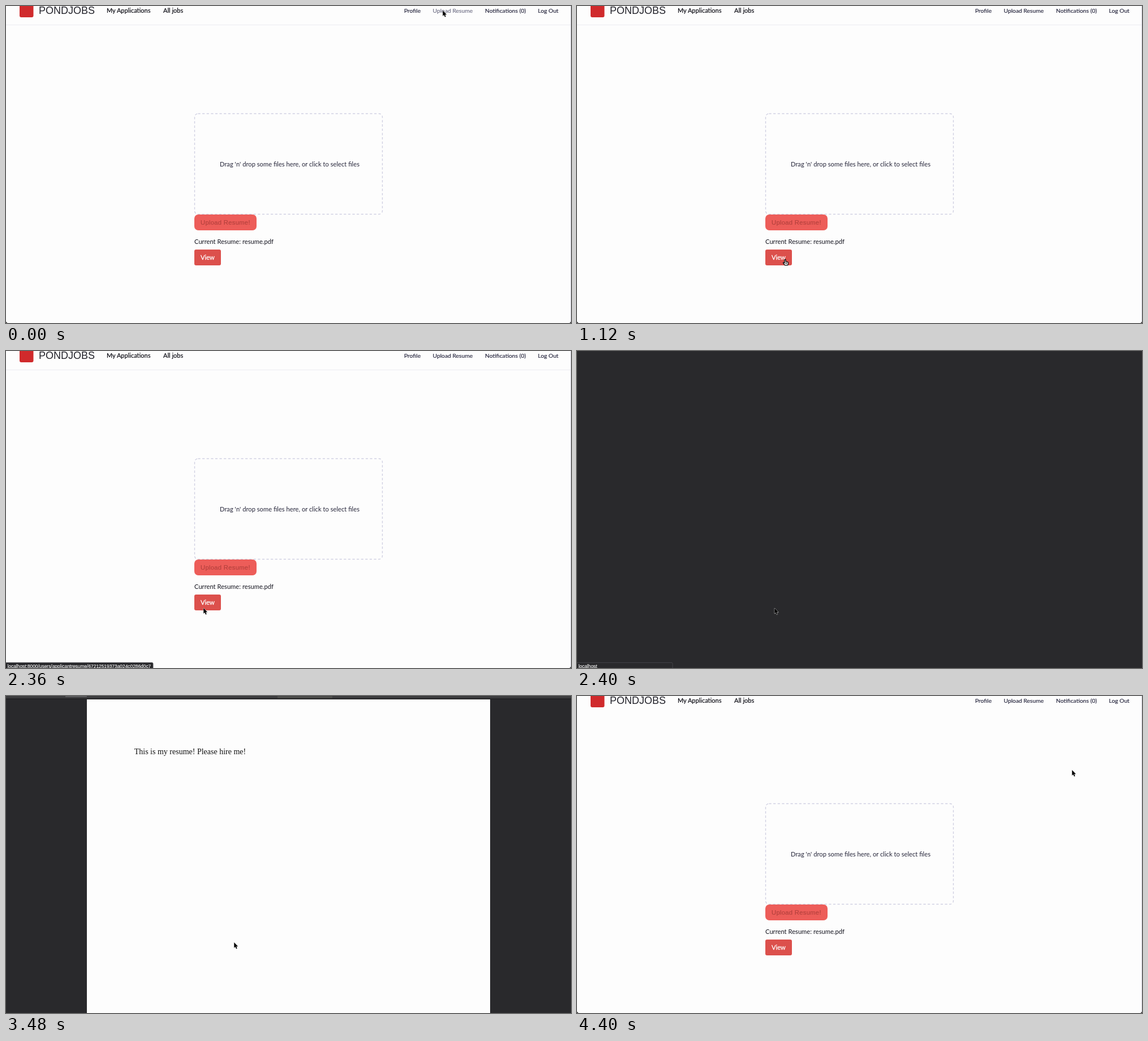
Animation, 999 px wide and 561 px high, one loop 4480 ms. Source, as an HTML page:

```html
<!DOCTYPE html>
<html lang="en">
<head>
<meta charset="utf-8">
<title>Resume upload</title>
<style>
  html, body { margin: 0; width: 100%; height: 100%; overflow: hidden; background: #fdfdfd; }
  svg { display: block; width: 999px; height: 561px; }
  text { font-family: Lato, sans-serif; font-size: 11.2px; fill: #14141f; white-space: pre; }
  .brand { font: 18px "Liberation Sans", Arial, sans-serif; fill: #23232b; }
  .main text { font-size: 11px; fill: #0c0c14; stroke: #0c0c14; stroke-width: .2px; }
  .side text { font-size: 10.3px; fill: #22223a; stroke: #22223a; stroke-width: .15px; }
  .side .hover { fill: #6d6d84; stroke: #6d6d84; }
  .off { font: 11.2px "Liberation Sans", Arial, sans-serif; letter-spacing: .02857em; fill: #b4423e; stroke: #b4423e; stroke-width: .2px; }
  .view { fill: #fff; stroke: #fff; stroke-width: .3px; }
  .letter { font: 14px "Liberation Serif", Times, serif; fill: #111; }
  .status text { font: 8.4px "Liberation Sans", Arial, sans-serif; fill: #f4f4f4; stroke: #f4f4f4; stroke-width: .15px; }
  .status rect { fill: #29292c; stroke: #4b4b50; stroke-width: .8; }
</style>
</head>
<body>
<svg viewBox="0 0 999 561">
  <g id="site">
    <rect width="999" height="561" fill="#fdfdfd"/>
    <rect x="24" y="-4" width="24.5" height="24" rx="3" fill="#d02a2c"/>
    <text class="brand" x="58" y="14">PONDJOBS</text>
    <g class="main">
      <text x="178" y="12">My Applications</text>
      <text x="278" y="12">All jobs</text>
    </g>
    <g class="side">
      <text x="704" y="11.5">Profile</text>
      <text id="upload" x="754.5" y="11.5">Upload Resume</text>
      <text x="847" y="11.5">Notifications (0)</text>
      <text x="940.5" y="11.5">Log Out</text>
    </g>
    <rect id="rule" y="33" width="998" height="1" fill="#ececf1"/>
    <rect x="333.5" y="190.5" width="332" height="178" rx="6" fill="none" stroke="#d0d0e2" stroke-width="1.4" stroke-dasharray="4.2 3.4"/>
    <text x="378" y="283.7" style="fill:#26263a">Drag 'n' drop some files here, or click to select files</text>
    <rect x="333" y="369" width="110" height="28" rx="7" fill="#ed5d59"/>
    <text class="off" x="344" y="386.5">Upload Resume!</text>
    <text x="333" y="420.7">Current Resume: resume.pdf</text>
    <rect x="333" y="431" width="47" height="28" rx="3" fill="#dc504c"/>
    <text class="view" x="344" y="449">View</text>
    <rect x="998" width="1" height="561" fill="#d9d9e4"/>
    <path d="M0 558.5V561H2.5ZM999 558.5V561H996.5Z" fill="#333"/>
  </g>
  <g id="viewer">
    <rect width="999" height="561" fill="#29292c"/>
    <g id="paper">
      <rect width="999" height="5" fill="#3b3b3d"/>
      <rect x="105" width="38" height="2" fill="#5c5c5e"/>
      <rect x="480" width="97" height="4" fill="#4b4b4a"/>
      <rect y="4.5" width="999" height="1.2" fill="#1d1d1f"/>
      <rect x="143" y="6" width="713" height="555" fill="#fdfdfd"/>
    </g>
    <text id="letter" class="letter" x="226.7" y="103">This is my resume! Please hire me!</text>
  </g>
  <g id="link" class="status">
    <rect x="-2" y="551.4" width="262" height="14" rx="2"/>
    <text x="2.5" y="560.8">localhost:8000/users/applicantresume/67212519373a024c0286d0c7</text>
  </g>
  <g id="host" class="status">
    <rect x="-2" y="551.4" width="171" height="14" rx="2"/>
    <text x="2.5" y="560.8">localhost</text>
  </g>
  <g id="pointer">
    <path id="arrow" d="M.3 0V9.8L2.5 7.8L4 11.4L5.7 10.7L4.2 7.2H7.2Z" fill="#000" stroke="#fff" stroke-width=".9" stroke-linejoin="round" paint-order="stroke"/>
    <path id="hand" d="M-1 0Q0-1.2 1 0V3.2L4.8 4.2Q5.8 4.6 5.6 6L4.8 9.6H-.6L-3.4 5.8Q-3.6 4.4-2.2 4.9L-1 6ZM1.2 5V7M3 5.3V7.2" fill="#fff" stroke="#000" stroke-width="1.2" stroke-linejoin="round"/>
  </g>
</svg>
<script>
const LOOP = 4480, STEP = 40;

// time, x, y of the pointer tip
const path = [
  [0, 772, 8], [560, 418, 462], [800, 374, 486], [1080, 368, 449], [1720, 368, 449],
  [2080, 349, 455], [2560, 349, 455], [2800, 403, 436], [3600, 403, 436],
  [4160, 968, 143], [4320, 968, 143], [4400, 875, 131], [LOOP, 875, 131]
];

// parts shown only between two times
const spans = {
  viewer: [2400, 3600],
  paper: [2480, 3600],
  letter: [2560, 3600],
  link: [1200, 2400],
  host: [2400, 2640],
  rule: [0, 3600],
  hand: [960, 2320]
};

const el = id => document.getElementById(id);
const within = (t, [from, to]) => t >= from && t < to;
const show = (id, on) => el(id).setAttribute("visibility", on ? "visible" : "hidden");

function place(t) {
  const i = path.findIndex(p => p[0] > t);
  const [t0, x0, y0] = path[i - 1], [t1, x1, y1] = path[i];
  const u = (t - t0) / (t1 - t0), k = u * u * (3 - 2 * u);
  return [x0 + (x1 - x0) * k, y0 + (y1 - y0) * k];
}

function draw(now) {
  const t = Math.floor((now % LOOP) / STEP) * STEP;
  for (const id in spans) show(id, within(t, spans[id]));
  show("arrow", !within(t, spans.hand));
  el("upload").classList.toggle("hover", t < 160);
  el("pointer").setAttribute("transform", `translate(${place(t)})`);
}

const start = performance.now();
function tick() {
  draw(performance.now() - start);
  requestAnimationFrame(tick);
}
tick();
</script>
</body>
</html>
```
